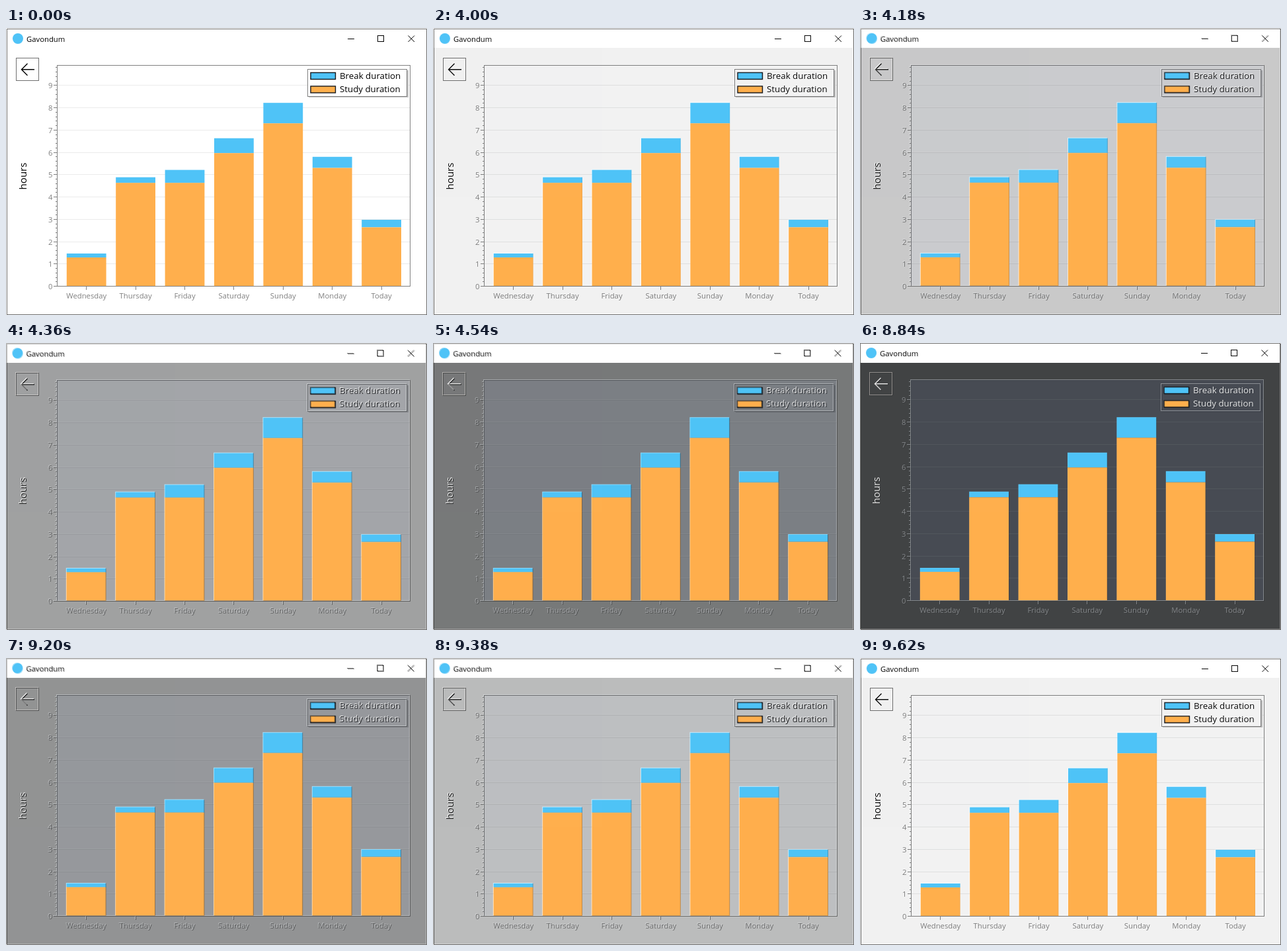
These frames come from a looping animation (637x434 px, 9.68 s). An HTML page:

```html
<!DOCTYPE html>
<html lang="en">
<head>
<meta charset="utf-8">
<title>Study chart</title>
<style>
  html, body { margin: 0; width: 100%; height: 100%; overflow: hidden; background: #fff; }
  svg { display: block; width: 637px; height: 434px; font-family: "Open Sans", "Noto Sans", sans-serif; }

  .light {
    --client: #fff; --plot: #fff; --grid: #ebebeb; --axis: #808080; --label: #808080;
    --ink: #000; --button: #707070; --legend: #808080; --shadow: #c4c4c4;
  }
  .dark {
    --client: #343637; --plot: #3a3f47; --grid: #464b52; --axis: #7c8084; --label: #7c7f82;
    --ink: #e8e8e8; --button: #8a8684; --legend: #868b90; --shadow: #3a3f47;
    animation: theme 9680ms infinite;
  }

  /* Fifteen equal steps of 60 ms each way; the last step back is the loop itself. */
  @keyframes theme {
    0% { opacity: 0; animation-timing-function: step-end; }
    41.322% { opacity: 0; animation-timing-function: steps(15, jump-start); }
    50.619% { opacity: 1; animation-timing-function: step-end; }
    91.322% { opacity: 1; animation-timing-function: steps(14, jump-start); }
    100% { opacity: .06667; }
  }

  .crisp { shape-rendering: crispEdges; }
  .line { fill: none; stroke-width: 1; }
  .client { fill: var(--client); }
  .plot { fill: var(--plot); }
  .grid { stroke: var(--grid); }
  .axis { stroke: var(--axis); }
  .label { fill: var(--label); font-size: 11.3px; }
  .ink { fill: var(--ink); }
  .arrow { stroke: var(--ink); stroke-width: 1.4; }
  .button { stroke: var(--button); }
  .legend { fill: var(--plot); stroke: var(--legend); }
  .shadow { fill: var(--shadow); }
  .legend-text { font-size: 13.3px; }
  .break { fill: #4fc3f7; }
  .study { fill: #ffaf4d; }
  .swatch { stroke: #14181c; stroke-width: 1.4; }
</style>
</head>
<body>
<svg viewBox="0 0 637 434">
  <defs>
    <g id="window">
      <rect class="crisp" x="1" y="1" width="636" height="433" fill="#fff"/>
      <rect class="client crisp" x="1" y="31" width="636" height="403"/>
      <rect class="line crisp" x="1.5" y="1.5" width="635" height="432" stroke="#707070"/>

      <circle class="break" cx="18" cy="16" r="8"/>
      <text x="31" y="21" font-size="11.3" fill="#000">Gavondum</text>
      <path class="line crisp" d="M517 16.5h10M562.5 11.5h9v9h-9z" stroke="#000"/>
      <path class="line" d="M608.5 11.5l9.5 9.5M618 11.5l-9.5 9.5" stroke="#000" stroke-width="1.1"/>

      <rect class="line button crisp" x="15.5" y="45.5" width="34" height="34"/>
      <path class="line arrow" d="M43 62.8H23.5M32.5 53.8l-9 9l9 9"/>
      <text class="ink" font-size="15" text-anchor="middle" transform="translate(31 224) rotate(-90)">hours</text>

      <rect class="plot crisp" x="77" y="56" width="535" height="335"/>
      <g id="chart"></g>
      <rect class="line axis crisp" x="77.5" y="56.5" width="534" height="334"/>

      <rect class="shadow crisp" x="458" y="64" width="151" height="41"/>
      <rect class="legend crisp" x="456.5" y="62.5" width="150" height="41"/>
      <rect class="break swatch" x="461" y="67.5" width="37.5" height="10"/>
      <rect class="study swatch" x="461" y="88" width="37.5" height="10"/>
      <text class="ink legend-text" x="505" y="77">Break duration</text>
      <text class="ink legend-text" x="505" y="97">Study duration</text>
    </g>
  </defs>
  <use class="light" href="#window"/>
  <g class="dark"><use href="#window" x="-1" y="-1"/></g>
</svg>
<script>
  const chart = document.getElementById('chart');
  const base = 390.5, unit = 33.77;
  const rowOf = value => Math.round(base - .3 - unit * value) + .5;

  // day, top of the break part, top of the study part
  const days = [
    ['Wednesday', 341, 347], ['Thursday', 225.7, 234.2], ['Friday', 214.6, 234.2],
    ['Saturday', 166.7, 189.2], ['Sunday', 113.2, 144.2], ['Monday', 194.8, 211.6],
    ['Today', 290, 301.4]
  ];

  function add(tag, attrs, text = '') {
    const node = document.createElementNS('http://www.w3.org/2000/svg', tag);
    for (const key in attrs) node.setAttribute(key, attrs[key]);
    node.textContent = text;
    chart.append(node);
  }

  let ticks = '';
  for (let i = 0; i < 50; i++) {
    const y = rowOf(i / 5);
    if (i % 5) {
      ticks += `M75 ${y}h2`;
      continue;
    }
    ticks += `M72 ${y}h5`;
    if (i) add('path', { class: 'line grid crisp', d: `M78 ${y}H611` });
    add('text', { class: 'label', x: 70.5, y: y + 4.5, 'text-anchor': 'end' }, i / 5);
  }

  days.forEach(([name, top, split], i) => {
    const x = 91.8 + 74.4 * i, center = x + 29.9, width = 59.8;
    add('rect', { class: 'break', x, y: top, width, height: split - top });
    add('rect', { class: 'study', x, y: split, width, height: base - split });
    add('text', { class: 'label', x: center, y: 409, 'text-anchor': 'middle' }, name);
    ticks += `M${Math.floor(center) + .5} 391v5`;
  });
  add('path', { class: 'line axis crisp', d: ticks });
</script>
</body>
</html>
```
